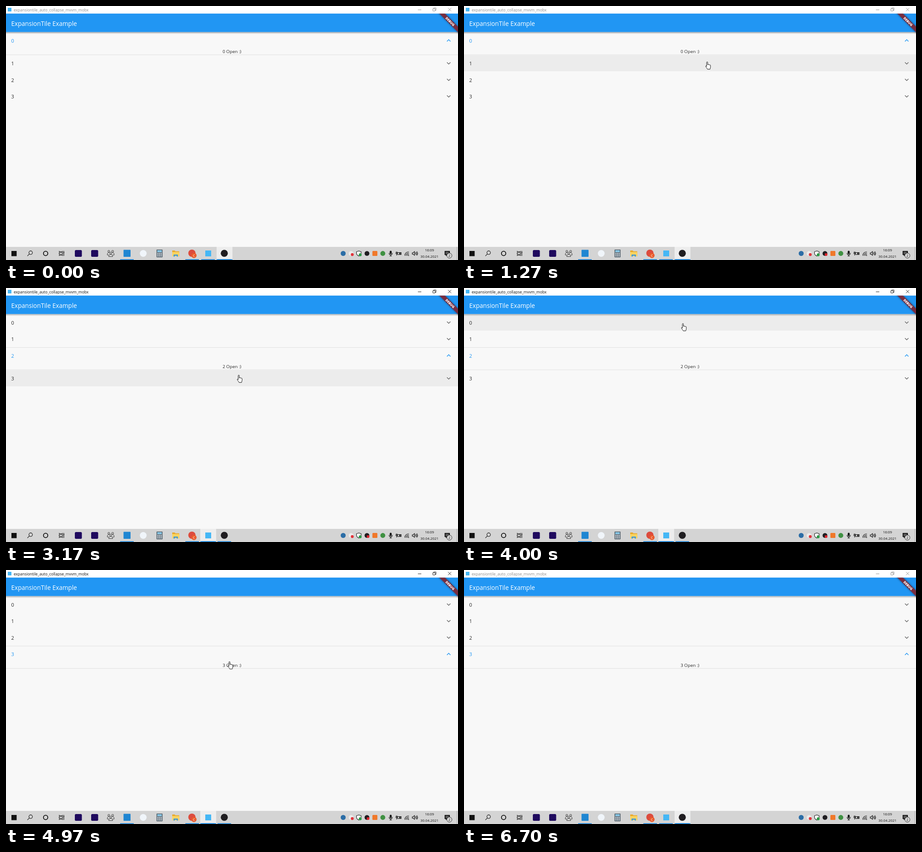
Write an HTML page that moves like this. It is 998 by 561 pixels and loops after 6760 ms.

```html
<!DOCTYPE html>
<html lang="en">
<head>
<meta charset="utf-8">
<title>ExpansionTile Example</title>
<style>
  html, body { margin: 0; width: 100%; height: 100%; overflow: hidden; background: #f8f8f8; }
  svg { display: block; }
  text { font-family: "Open Sans", "Noto Sans", sans-serif; }
  .line { fill: none; stroke: #111; stroke-width: 1.1; }
  .run { fill: #0078d7; }
  .mid { text-anchor: middle; }
  .band { fill: #792d3f; filter: drop-shadow(0 0 2px rgba(0, 0, 0, .5)); }
</style>
</head>
<body>
<svg id="stage" width="998" height="561" viewBox="0 0 998 561">
  <defs>
    <linearGradient id="shade" x1="0" y1="0" x2="0" y2="1">
      <stop offset="0" stop-color="#000" stop-opacity=".3"/>
      <stop offset="1" stop-color="#000" stop-opacity="0"/>
    </linearGradient>
    <clipPath id="app"><rect y="16.5" width="998" height="515.5"/></clipPath>
  </defs>
  <rect width="998" height="561" fill="#f8f8f8"/>
  <g id="rows"></g>

  <!-- app bar -->
  <rect y="57.5" width="998" height="4.5" fill="url(#shade)"/>
  <rect y="16.5" width="998" height="41" fill="#2196f3"/>
  <text x="11.5" y="43.8" font-size="13.6" fill="#fff">ExpansionTile Example</text>
  <g clip-path="url(#app)">
    <g transform="translate(980.5 34.2) rotate(45)">
      <rect class="band" x="-40" y="-4.4" width="80" height="8.8"/>
      <text class="mid" y="2.7" font-size="7.3" font-weight="800" fill="#fff">DEBUG</text>
    </g>
  </g>

  <!-- window title bar -->
  <rect width="998" height="16.5" fill="#fff"/>
  <rect x="4" y="4" width="8" height="8" fill="#45b7f5"/>
  <text id="title" x="17" y="11.6" font-size="8.5">expansiontile_auto_collapse_mvvm_mobx</text>
  <g id="buttons" fill="none" stroke-width=".9">
    <path d="M909.5 8.5h7.5M942.5 6h5v5h-5zM944.3 6v-1.7h5.2v5.2h-2M976 4.3l7 7M983 4.3l-7 7"/>
  </g>

  <!-- taskbar -->
  <rect y="532" width="998" height="29" fill="#d4d4d4"/>
  <rect id="active" y="532" width="35" height="29" fill="#ededed"/>
  <g id="runs"></g>
  <rect id="activeRun" class="run" y="559.5" width="35" height="1.5"/>

  <rect x="12" y="541" width="11.5" height="11.5" fill="#111"/>
  <g class="line">
    <circle cx="54.5" cy="544.8" r="3.9"/><path d="M51.7 547.6l-4.5 4.6"/>
    <circle cx="87.5" cy="546.5" r="4.8" stroke-width="1.8"/>
    <path d="M117.5 541v1.5h7.5V541M117.5 544.5h7.5v4h-7.5zM117.5 552v-1.5h7.5v1.5M127.7 541v11M126.5 544.5h2.4"/>
    <g stroke-width=".8">
      <circle cx="227" cy="541.8" r="2.1"/><circle cx="235.5" cy="541.8" r="2.1"/>
      <circle cx="231.2" cy="546" r="2.2"/>
      <path d="M226.8 553.5c0-6.5 8.8-6.5 8.8 0zM223.7 550c0-5 2-5.8 4.4-5.3M238.8 550c0-5-2-5.8-4.4-5.3M223.7 550h3.4M235.3 550h3.5"/>
    </g>
  </g>
  <rect x="152" y="539" width="15.5" height="15" rx="2.5" fill="#1f0a5e"/>
  <rect x="188" y="539" width="15.5" height="15" rx="2.5" fill="#1f0a5e"/>
  <rect x="259.5" y="538.5" width="15.5" height="15.5" rx="1" fill="#1f86d2"/>
  <circle cx="303" cy="546.5" r="7.5" fill="#f0f5fa"/>
  <rect x="332.5" y="538" width="13" height="17" fill="#4b5a66"/>
  <rect x="334" y="539.5" width="10" height="4" fill="#8fd0f0"/>
  <g id="keys" fill="#e6edf2"></g>
  <path d="M367 540h5.5l1.5 1.7h8.5V553H367z" fill="#e9a92b"/>
  <path d="M367 543.5h15.5V553H367z" fill="#fcd462"/>
  <path d="M370 553.5v-4.5h9.5v4.5h-2.5v-2h-4.5v2z" fill="#3b96dc"/>
  <circle cx="410.5" cy="546" r="8" fill="#dc4b3e"/>
  <circle cx="415" cy="551" r="5.8" fill="#ea5a2b"/>
  <text class="mid" x="415" y="553.6" font-size="7.2" fill="#fff">C</text>
  <rect x="440" y="540" width="13" height="13" fill="#45b7f5"/>
  <circle cx="482" cy="546.3" r="7.8" fill="#1f1d20"/>

  <!-- tray -->
  <circle cx="744.5" cy="546.5" r="5.5" fill="#2b6da6"/>
  <circle cx="762" cy="546.5" r="5.2" fill="#ececec"/>
  <circle cx="764.5" cy="549" r="3.2" fill="#e0343b"/>
  <path d="M779 541l5 1.6v3.4c0 3-2.2 5-5 6.3c-2.8-1.3-5-3.3-5-6.3v-3.4z" fill="#fff" stroke="#111" stroke-width="1.1"/>
  <circle cx="782" cy="549.5" r="3.2" fill="#2c9a46"/>
  <circle cx="797" cy="546.5" r="5.3" fill="#1f1d20"/>
  <circle id="rec" cx="799.5" cy="549" r="3" fill="#e0242c"/>
  <rect x="809" y="541" width="11" height="11" rx="1.5" fill="#f0782a"/>
  <circle cx="832" cy="546.5" r="5.4" fill="#3f9142"/>
  <rect x="847.3" y="540.5" width="4.2" height="7.5" rx="2.1" fill="#111"/>
  <path class="line" d="M845.8 545.5c0 5.5 7.2 5.5 7.2 0M849.4 549.6v2.6M847 552.2h4.8"/>
  <g class="line" stroke-width=".9">
    <path d="M864.5 544.5h8v4.5h-8zM861.5 542.5v2.5M863.5 542.5v2.5M861 545h3v2h-3zM862.5 547v4M868 545l3.5 3.5M871.5 545l-3.5 3.5"/>
    <path d="M880.5 551.5c0-5 4-8.8 9-8.8M883.3 551.5c0-3.5 2.7-6 6.2-6M886 551.5c0-2 1.5-3.3 3.5-3.3"/>
    <path d="M897 545h2l3-2.7v8.5l-3-2.7h-2zM903.5 544.7q1.5 1.8 0 3.7M905.2 543.3q2.7 3.2 0 6.5M907 542q3.7 4.5 0 9"/>
  </g>
  <circle cx="888.8" cy="551" r="1" fill="#111"/>
  <text class="mid" x="935" y="542" font-size="7.9" fill="#111">16:09</text>
  <text class="mid" x="935" y="555.5" font-size="7.8" fill="#111">30.04.2021</text>
  <path d="M968.5 541h11.5v9h-6.5l-2.5 2.5v-2.5h-2.5z" fill="#111"/>
  <path d="M970.5 543.5h7.5M970.5 545.5h7.5M970.5 547.5h5" stroke="#d4d4d4" stroke-width=".7"/>
  <circle cx="979" cy="551.3" r="5.6" fill="#d8d8d8" stroke="#222" stroke-width=".9"/>
  <text class="mid" x="979" y="554.1" font-size="7.5" fill="#111">2</text>
  <path d="M995.5 532v29" stroke="#a8a8a8" stroke-width=".8"/>

  <g id="cursor" fill="#fff" stroke="#111" stroke-width="1" stroke-linejoin="round">
    <path id="hand" transform="translate(-6 -8.3)" d="M3.2 11V1.9a1.2 1.2 0 0 1 2.4 0V7.2a1.1 1.1 0 0 1 2.2.2a1.1 1.1 0 0 1 2.1.4a1.1 1.1 0 0 1 1.9.9V12c0 2-1 3-1.2 5H5c-.4-1.8-2.6-3.6-4-6.2c-.4-1 .8-1.7 1.5-.9z"/>
    <path id="arrow" transform="translate(-2 -8)" d="M0 0v13l3-2.8l2 4.8l2.2-1l-2-4.6h4z" stroke-width=".8"/>
  </g>
</svg>
<script>
const LOOP = 6760, TOP = 58, ROW = 36.5, BODY = 13.7, EXPAND = 200;
const NS = "http://www.w3.org/2000/svg";
const $ = id => document.getElementById(id);

// [time, tile that opens]
const opens = [[-EXPAND, 0], [1480, 1], [2400, 2], [4420, 3]];
// [time, x, y] of the pointer's centre
const path = [
  [300, 566, 576], [950, 540, 138], [1200, 538.5, 131], [1750, 538.5, 131],
  [2100, 535, 178], [2200, 534, 200], [2330, 532, 183], [2500, 532, 183],
  [2700, 530, 192], [2970, 530, 192], [3170, 515.5, 200], [3470, 490, 96],
  [3670, 490, 96], [3800, 485, 86], [4000, 485, 86], [4320, 495, 210],
  [4970, 495, 210], [5530, 502, 240]
];
const FOCUS = [1430, 6670], RECORD = [900, 6670], POINTER = [300, 6670], HOVER_LAG = 70;

const within = (t, [a, b]) => t >= a && t < b;
const clamp = p => Math.max(0, Math.min(1, p));
const smooth = p => p * p * (3 - 2 * p);
const easeIn = p => Math.pow(p, 1.7);
const mix = (a, b, p) => `rgb(${a.map((v, i) => Math.round(v + (b[i] - v) * p))})`;
const BLUE = [33, 150, 243], INK = [40, 40, 40], GREY = [105, 105, 105];

function add(parent, tag, attrs, text) {
  const el = document.createElementNS(NS, tag);
  for (const k in attrs) el.setAttribute(k, attrs[k]);
  if (text) el.textContent = text;
  parent.append(el);
  return el;
}

function makeRow(i) {
  const g = add($("rows"), "g", {});
  const border = { width: 998, height: 0.8, fill: "#000" };
  const hover = add(g, "rect", { y: 0.5, width: 998, height: 35.5, fill: "#ececec" });
  const top = add(g, "rect", border), bottom = add(g, "rect", border);
  const num = add(g, "text", { x: 11.6, y: 22.9, "font-size": 11 }, String(i));
  const icon = add(g, "path", { d: "M16.59 8.59L12 13.17 7.41 8.59 6 10l6 6 6-6z" });
  const body = add(g, "svg", { y: 35.8, width: 998, overflow: "hidden" });
  const label = add(body, "text", { class: "mid", x: 498.8, "font-size": 9.8, fill: "#282828" }, i + " Open :)");
  return { g, hover, top, bottom, num, icon, body, label };
}

const rows = [0, 1, 2, 3].map(makeRow);
for (const x of [252, 396, 431, 467])
  add($("runs"), "rect", { class: "run", x, y: 559.5, width: 30, height: 1.5 });
for (let k = 0; k < 9; k++)
  add($("keys"), "rect", { x: 334 + (k % 3) * 3.7, y: 545 + Math.floor(k / 3) * 3.1, width: 2.6, height: 2 });

function pointerAt(t) {
  const n = path.findIndex(p => p[0] > t);
  if (n === 0) return path[0].slice(1);
  if (n < 0) return path[path.length - 1].slice(1);
  const a = path[n - 1], b = path[n], p = smooth((t - a[0]) / (b[0] - a[0]));
  return [a[1] + (b[1] - a[1]) * p, a[2] + (b[2] - a[2]) * p];
}

function openness(i, t) {
  const n = opens.filter(o => o[0] <= t).length - 1;
  const p = clamp((t - opens[n][0]) / EXPAND);
  if (opens[n][1] === i) return p;
  return n > 0 && opens[n - 1][1] === i ? 1 - p : 0;
}

function drawRows(t) {
  const tip = within(t, POINTER) ? pointerAt(t - HOVER_LAG)[1] - 7 : -1;
  let y = TOP;
  rows.forEach((r, i) => {
    const v = openness(i, t), e = easeIn(v), h = BODY * e;
    r.g.setAttribute("transform", `translate(0 ${y})`);
    r.hover.setAttribute("opacity", tip > y && tip < y + 35 ? 1 : 0);
    r.top.setAttribute("opacity", 0.13 * v);
    r.bottom.setAttribute("opacity", 0.13 * v);
    r.bottom.setAttribute("y", ROW + h - 0.8);
    r.num.setAttribute("fill", mix(INK, BLUE, e));
    r.icon.setAttribute("fill", mix(GREY, BLUE, e));
    r.icon.setAttribute("transform", `translate(977.5 18.2) rotate(${180 * e}) scale(.73) translate(-12 -12)`);
    r.body.setAttribute("height", h);
    r.body.style.display = h > 0.1 ? "" : "none";
    r.label.setAttribute("y", h / 2 + 3.7);
    y += ROW + h;
  });
  return y;
}

function draw(t) {
  const end = drawRows(t), focused = within(t, FOCUS);
  const [x, y] = pointerAt(t), overList = y - 7 < end;
  $("cursor").setAttribute("transform", `translate(${x} ${y})`);
  $("cursor").style.display = within(t, POINTER) ? "" : "none";
  $("hand").style.display = overList ? "" : "none";
  $("arrow").style.display = overList ? "none" : "";
  $("rec").style.display = within(t, RECORD) ? "" : "none";
  $("title").setAttribute("fill", focused ? "#111" : "#8c8c8c");
  $("buttons").setAttribute("stroke", focused ? "#111" : "#8c8c8c");
  for (const id of ["active", "activeRun"]) $(id).setAttribute("x", focused ? 429 : 465);
}

const start = performance.now();
function tick() {
  draw((performance.now() - start) % LOOP);
  requestAnimationFrame(tick);
}
tick();
</script>
</body>
</html>
```
